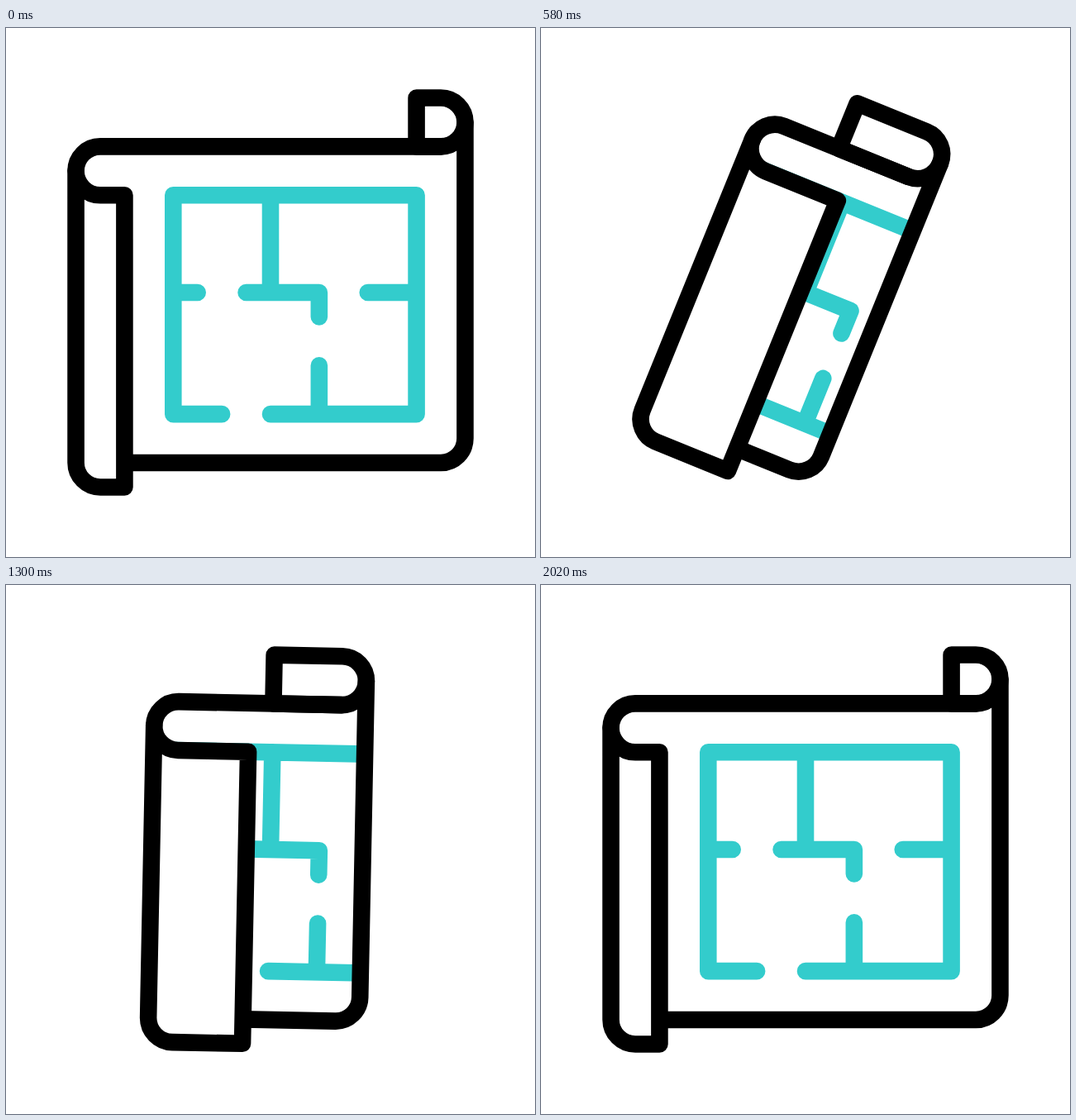
These frames come from a looping animation (640 by 640 pixels, 2400 ms). An HTML page:

```html
<!DOCTYPE html>
<html lang="en">
<head>
<meta charset="utf-8">
<title>Blueprint</title>
<style>
  html, body { margin: 0; height: 100%; overflow: hidden; background: #fff; }
  svg { display: block; width: 100vw; height: 100vh; }
</style>
</head>
<body>
<svg viewBox="0 0 640 640">
  <defs><clipPath id="sheet"><rect id="area" x="-9" y="-9" height="18"/></clipPath></defs>
  <g id="scroll" fill="none" stroke="#000" stroke-width=".7" stroke-linecap="round" stroke-linejoin="round">
    <g clip-path="url(#sheet)">
      <path stroke="#33cccc" d="M-2 5H-4V-4H6V5H0M-4 0H-3M0-4V0M-1 0H2V1M4 0H6M2 3V5"/>
    </g>
    <path id="body"/>
    <path id="flap" fill="#fff"/>
    <path id="curl"/>
  </g>
</svg>
<script>
const LOOP = 2400, UNIT = 29.43;
const $ = id => document.getElementById(id);
const set = (id, name, value) => $(id).setAttribute(name, value);
const smooth = u => u * u * (3 - 2 * u);

// [time in ms, degrees]
const swing = [[0, 0], [630, 22.5], [925, -13], [1165, 5], [1455, -3.5], [1605, 0], [LOOP, 0]];

function angleAt(t) {
  const i = swing.findIndex(key => key[0] > t);
  const [t0, a] = swing[i - 1], [t1, b] = swing[i];
  return a + (b - a) * smooth((t - t0) / (t1 - t0));
}

// Roll up, loosen slowly, then unroll
function rollAt(t) {
  if (t < 527) return 6.966 * smooth(t / 527);
  if (t < 1605) return 6.966 - 1.665 * ((t - 527) / 1078) ** 1.65;
  const u = Math.min(1, (t - 1605) / 412);
  return 5.301 * (1 - 1.3 * u - 0.4 * u * u + 0.7 * u ** 3);
}

function draw(now) {
  const t = now % LOOP, roll = rollAt(t);
  const left = -8 + 0.519 * roll, fold = -6 + 0.834 * roll;
  const right = 8 - 0.7 * roll, tip = 6 - roll;

  set('scroll', 'transform', `translate(320 320) rotate(${angleAt(t)}) scale(${UNIT})`);
  set('area', 'width', right + 9);
  set('body', 'd', `M${left} -5A1 1 0 0 1 ${left + 1} -6H${right - 1}M${right} -7V6A1 1 0 0 1 ${right - 1} 7H${fold}`);
  set('flap', 'd', `M${left} -5V7A1 1 0 0 0 ${left + 1} 8H${fold}V-4H${left + 1}A1 1 0 0 1 ${left} -5`);
  set('curl', 'd', `M${tip} -6V-8H${right - 1}A1 1 0 0 1 ${right - 1} -6Z`);
  requestAnimationFrame(() => draw(performance.now() - start));
}

const start = performance.now();
draw(0);
</script>
</body>
</html>
```
